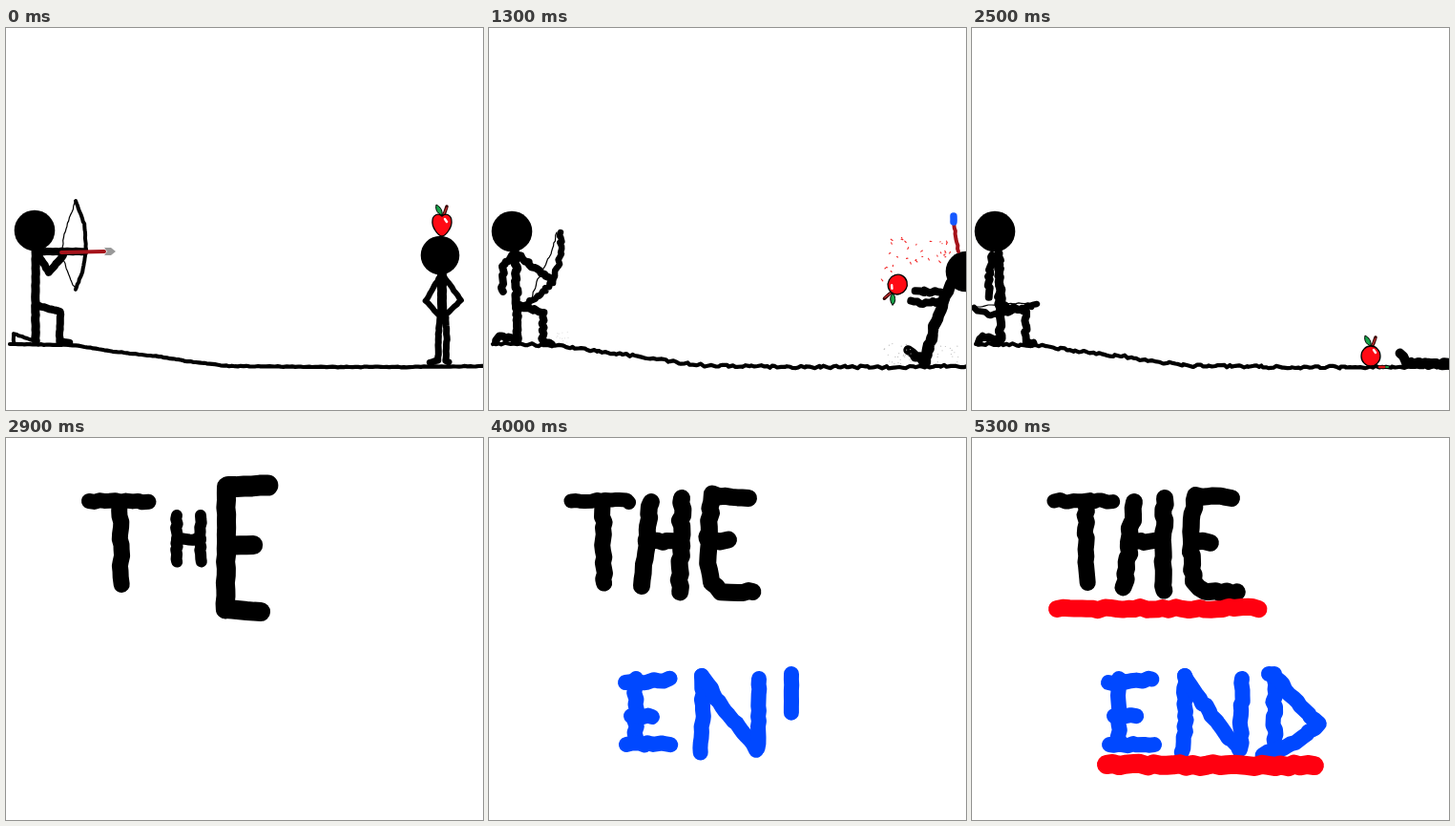
These frames come from a looping animation (500 by 400 pixels, 5.4 s). An HTML page:

```html
<!DOCTYPE html>
<html lang="en">
<head>
<meta charset="utf-8">
<title>The End</title>
<style>
html, body { margin: 0; width: 100%; height: 100%; overflow: hidden; background: #fff; }
svg { display: block; width: 100vw; height: 100vh; }
path { fill: none; stroke-linecap: round; stroke-linejoin: round; }
</style>
</head>
<body>
<svg id="stage" viewBox="0 0 500 400"></svg>
<script>
const STEP = 100, STEPS = 54;
const RELEASE = 4, HIT = 9, TITLE = 26;
const BLACK = '#000', BLUE = '#0048ff', RED = '#ff0010', SHAFT = '#a5121a';
const stage = document.getElementById('stage');

let seed = 1;
function rnd() {
  seed = (seed * 16807) % 2147483647;
  return seed / 2147483647;
}
const reseed = n => { seed = n * 7919 + 101; rnd(); rnd(); };
const spread = a => (rnd() * 2 - 1) * a;
const clamp = v => Math.max(0, Math.min(1, v));
const mix = (a, b, k) => a + (b - a) * k;
const pts = s => s.split(' ').map(p => p.split(',').map(Number));

// Blend between poses: [step, 'x,y x,y ...'] in order of time.
function pose(f, ...keys) {
  let i = 0;
  while (i < keys.length - 2 && f >= keys[i + 1][0]) i++;
  const [t0, a] = keys[i], [t1, b] = keys[i + 1];
  const k = clamp((f - t0) / (t1 - t0)), q = pts(b);
  return pts(a).map((p, n) => p.map((v, m) => mix(v, q[n][m], k)));
}

const toPath = p => 'M' + p.map(a => a.map(v => v.toFixed(1)).join(' ')).join('L');
const line = (p, w, color) => `<path d="${toPath(p)}" stroke="${color}" stroke-width="${w}"/>`;
const disc = (x, y, r, color) => `<circle cx="${x}" cy="${y}" r="${r}" fill="${color}"/>`;

// Hand-drawn stroke: shaky points along the first part of a polyline.
function rough(p, w, color, amp, part = 1) {
  const lens = p.slice(1).map((b, i) => Math.hypot(b[0] - p[i][0], b[1] - p[i][1]));
  let left = lens.reduce((a, b) => a + b, 0) * part;
  const gap = Math.max(3, w * .35), out = [p[0]];
  for (let i = 0; i < lens.length && left > 0; i++) {
    const end = Math.min(lens[i], left), n = Math.max(1, Math.round(end / gap));
    for (let j = 1; j <= n; j++) {
      const k = end * j / n / (lens[i] || 1);
      out.push([
        mix(p[i][0], p[i + 1][0], k) + spread(amp),
        mix(p[i][1], p[i + 1][1], k) + spread(amp)
      ]);
    }
    left -= lens[i];
  }
  return line(out, w, color);
}

function ground(f, amp) {
  const p = pts('4,331 70,332 115,339 160,344 190,349 234,354 330,355 420,355 502,354');
  return rough(p, 4.2, BLACK, amp);
}

function archer(f, amp) {
  const limb = (w, ...keys) => rough(pose(f, ...keys), w, BLACK, amp);
  const [[hx, hy]] = pose(f, [6, '30,212'], [13, '24,213']);
  const bow = pose(f,
    [6, '73,181 82,205 84,232 81,252 73,274'],
    [13, '75,214 75,237 68,264 52,280 38,289'],
    [19, '68,289 58,292 45,296 20,301 3,294']);
  const nock = f < RELEASE
    ? pts('73,181 61,216 58,235 63,252 73,274')
    : pose(f,
      [6, '73,181 73,205 73,228 73,250 73,274'],
      [13, '71,214 66,234 58,250 50,266 44,285'],
      [19, '68,289 52,288 35,289 20,290 3,293']);
  return limb(9, [6, '31,233 31,282 31,328'], [13, '28,236 29,284 30,328'])
    + limb(8, [6, '31,290 57,297 56,328 66,330'], [13, '32,290 57,298 56,329 65,330'])
    + limb(mix(4, 8, clamp(f / 13)), [6, '31,328 8,320 8,330'], [13, '30,327 10,322 6,329'])
    + limb(8, [6, '34,234 58,234 82,234'], [13, '30,238 48,251 66,264'], [19, '28,238 29,262 31,290'])
    + limb(8, [6, '33,236 45,256 60,238'], [13, '24,238 15,250 14,277'], [19, '21,238 18,258 18,281'])
    + rough(nock, 1.2, BLACK, .6)
    + rough(bow, mix(4, 6.5, clamp((f - 6) / 7)), BLACK, amp)
    + disc(hx, hy, 21.3, BLACK);
}

function victim(f, amp) {
  const limb = (w, stand, tip, lie) =>
    rough(pose(f, [HIT, stand], [13, tip], [17, lie]), w, BLACK, amp);
  const [[hx, hy]] = pose(f, [HIT, '455,238'], [13, '500,255'], [17, '565,345']);
  const bulk = clamp((f - HIT) / 4);
  return limb(mix(10, 12, bulk), '457,258 457,302', '484,268 466,312', '540,352 496,352')
    + limb(mix(6, 8, bulk), '455,260 440,286 453,300', '482,276 464,276 448,276', '538,350 525,352 510,352')
    + limb(mix(6, 8, bulk), '459,260 477,285 461,300', '478,286 460,288 442,287', '538,352 525,353 510,353')
    + limb(mix(7, 10, bulk), '455,303 453,326 453,348 444,350', '466,312 461,332 456,349 440,338', '500,352 478,352 455,351 449,341')
    + limb(mix(7, 10, bulk), '461,303 462,326 461,348 464,350', '467,312 463,332 458,350 455,350', '500,352 478,352 460,351 455,351')
    + disc(hx, hy, mix(20.3, 21.3, bulk), BLACK);
}

function arrow(f) {
  if (f < HIT) {
    const x = mix(109, 434, Math.max(0, f - RELEASE + 1) / (HIT - RELEASE + 1));
    const loose = f >= RELEASE;
    return line([[x - 51, 235], [x - 6, 234]], 4, SHAFT)
      + (loose ? line([[x - 56, 235], [x - 49, 235]], 8, BLUE) : '')
      + `<path d="M${x - 6} 230L${x + 1} 230L${x + 6} 234L${x + 1} 238L${x - 6} 238L${x - 3} 234Z" style="fill:#999"/>`;
  }
  const [tip, tail] = pose(f, [HIT, '438,237 390,235'], [13, '492,234 487,203'], [17, '550,330 550,300']);
  const d = Math.hypot(tail[0] - tip[0], tail[1] - tip[1]);
  const end = tail.map((v, i) => v + (v - tip[i]) / d * 6);
  return rough([tip, tail], 4, SHAFT, .5) + rough([tail, end], 7.5, '#1558ff', 1.2);
}

function apple(f) {
  const [[x, y, turn]] = f < HIT ? [[457, 206, 0]]
    : f < 13 ? [[457 - 7.25 * (f - HIT), 206 + 63 * ((f - HIT) / 4) ** 2, -37.75 * (f - HIT)]]
    : pose(f, [13, '428,269,-151'], [15, '418,341,-240'], [16, '416,335,-290'], [18, '418,343,-360']);
  const body = f < HIT
    ? 'M0-9C4-13 10-10 10-4C11 2 4 12 0 12C-4 12-11 2-10-4C-10-10-4-13 0-9Z'
    : 'M0-10A10 10.5 0 1 1 0 11A10 10.5 0 1 1 0-10Z';
  return `<g transform="translate(${x} ${y}) rotate(${turn})" stroke="#000">
    <path d="M1-9L3-13L5-19" stroke="#300" stroke-width="3.5"/>
    <path d="M2-11L5-18" stroke="#c33" stroke-width="1.2"/>
    <path d="M0-10C-6-12-7-17-6-21C-2-19 1-15 0-10Z" stroke-width="1" style="fill:#16a34a"/>
    <path d="${body}" stroke-width="1.3" style="fill:#ff0a14"/>
    <path d="M3-6L5-3" stroke="#fff" stroke-width="2.4"/></g>`;
}

// Small flecks thrown off by the hit.
function spray(f) {
  const k = (f - HIT) / 4;
  if (k <= 0 || f > 18) return '';
  let out = '';
  reseed(77);
  for (let i = 0; i < 34; i++) {
    const ex = 411 + rnd() * 76, ey = 220 + rnd() * (18 + (488 - ex) * .42);
    const dx = spread(2), dy = spread(2);
    const x = mix(472, ex, Math.min(k, 1.4)), y = mix(236, ey, k) + 26 * k * (k - 1);
    if (y < 352) out += line([[x, y], [x + dx, y + dy]], 1.1, '#f22b2b');
  }
  return out;
}

function dust(f) {
  if (f < 11 || f > 18) return '';
  let out = '';
  reseed(f + 300);
  const cloud = (n, x, y, w, h, color) => {
    while (n--) out += disc(x + rnd() * w, y + rnd() * h, .6, color);
  };
  cloud(26, 414, 330, 30, 22, '#bbb');
  cloud(16, 466, 330, 26, 20, '#bbb');
  cloud(12, 70, 317, 20, 13, '#ddd');
  return out;
}

function scene(f) {
  const amp = mix(.35, 1.4, clamp(f / 10));
  let out = ground(f, amp) + archer(f, amp) + victim(f, amp);
  if (f >= 17) out += line(pts('427,355 432,355'), 2.5, '#e01818') + line(pts('434,355 436,355'), 2, '#2a9a4a');
  return out + arrow(f) + apple(f) + spray(f) + dust(f);
}

// Pen strokes: [points, width, colour, first step, steps to draw].
const draft = [
  ['87,66 149,66', 16, BLACK, 26, 1],
  ['119,70 121,152', 17, BLACK, 26, 1],
  ['179,81 179,130', 12, BLACK, 27, 1],
  ['204,81 204,130', 12, BLACK, 27, 1],
  ['179,106 204,106', 12, BLACK, 27, 1],
  ['231,51 230,180', 20, BLACK, 28, 1],
  ['233,51 274,50', 22, BLACK, 28, 1],
  ['232,113 259,112', 20, BLACK, 29, 1],
  ['230,179 267,182', 20, BLACK, 29, 1]
];
const title = [
  ['86,66 148,66', 15, BLACK, 28, 1],
  ['119,70 121,153', 17, BLACK, 28, 1],
  ['170,67 165,108 160,155', 18, BLACK, 28, 1],
  ['202,63 200,161', 18, BLACK, 28, 1],
  ['165,108 198,109', 17, BLACK, 28, 1],
  ['272,63 234,60 229,105 232,151 243,160 278,162', 18, BLACK, 28, 1],
  ['231,108 250,108', 18, BLACK, 28, 1],
  ['143,256 190,253', 16, BLUE, 32, 1],
  ['154,252 153,318', 16, BLUE, 33, 1],
  ['149,291 171,292', 16, BLUE, 34, 1],
  ['144,321 191,320', 16, BLUE, 35, 1],
  ['223,249 224,285 221,330', 16, BLUE, 37, 1],
  ['223,249 248,286 281,326', 16, BLUE, 38, 1],
  ['283,252 282,325', 16, BLUE, 39, 1],
  ['317,247 317,328', 16, BLUE, 40, 2],
  ['311,247 319,250 336,272 364,300 340,318 306,331', 16, BLUE, 42, 2],
  ['89,179 301,178', 18, RED, 44, 1]
];

function write(strokes, f) {
  return strokes.filter(s => f >= s[3]).map(([p, w, color, start, time]) =>
    rough(pts(p), w, color, Math.min(1.7, .2 + .4 * (f - start)), clamp((f - start + 1) / time))
  ).join('');
}

// Zigzag flash; odd points are its outer tips.
function flash(path, dx = 0, dy = 0) {
  const p = pts(path).map(([x, y]) => [x + dx + spread(1), y + dy + spread(1)]);
  let tips = '';
  for (let i = 1; i < p.length; i += 2) {
    const inner = p[i].map((v, n) => mix(v, p[i - 1][n], .45));
    tips += rough([inner, p[i]], 11, '#ffc02e', .6);
  }
  return tips + rough(p, 7, '#ffff1c', .9);
}
const leftFlash = '92,163 49,139 72,156 51,161 75,174 47,193 72,187 55,214 90,197';
const rightFlash = '306,157 350,123 322,150 341,164 324,166 343,186 318,174 330,207';

function ending(f) {
  if (f < 30) return write(draft, f);
  let out = write(title, f);
  if (f >= 45) {
    out += f < 49
      ? rough(pts('119,333 185,334 240,337 368,338'), 36, RED, .2 + .3 * (f - 45))
      : rough(pts('141,342 359,343'), 20, RED, 1.5);
  }
  if (f >= 45 && f < 48) out += flash(leftFlash) + flash(rightFlash);
  if (f >= 46 && f < 50) out += flash(leftFlash, -28, 180) + flash(rightFlash, 76, 184);
  return out;
}

let shown = -1;
function draw(now) {
  const f = Math.floor(now / STEP) % STEPS;
  if (f !== shown) {
    shown = f;
    reseed(f + 1);
    stage.innerHTML = f < TITLE ? scene(f) : ending(f);
  }
}

const begin = performance.now();
function tick() {
  draw(performance.now() - begin);
  requestAnimationFrame(tick);
}
tick();
</script>
</body>
</html>
```
